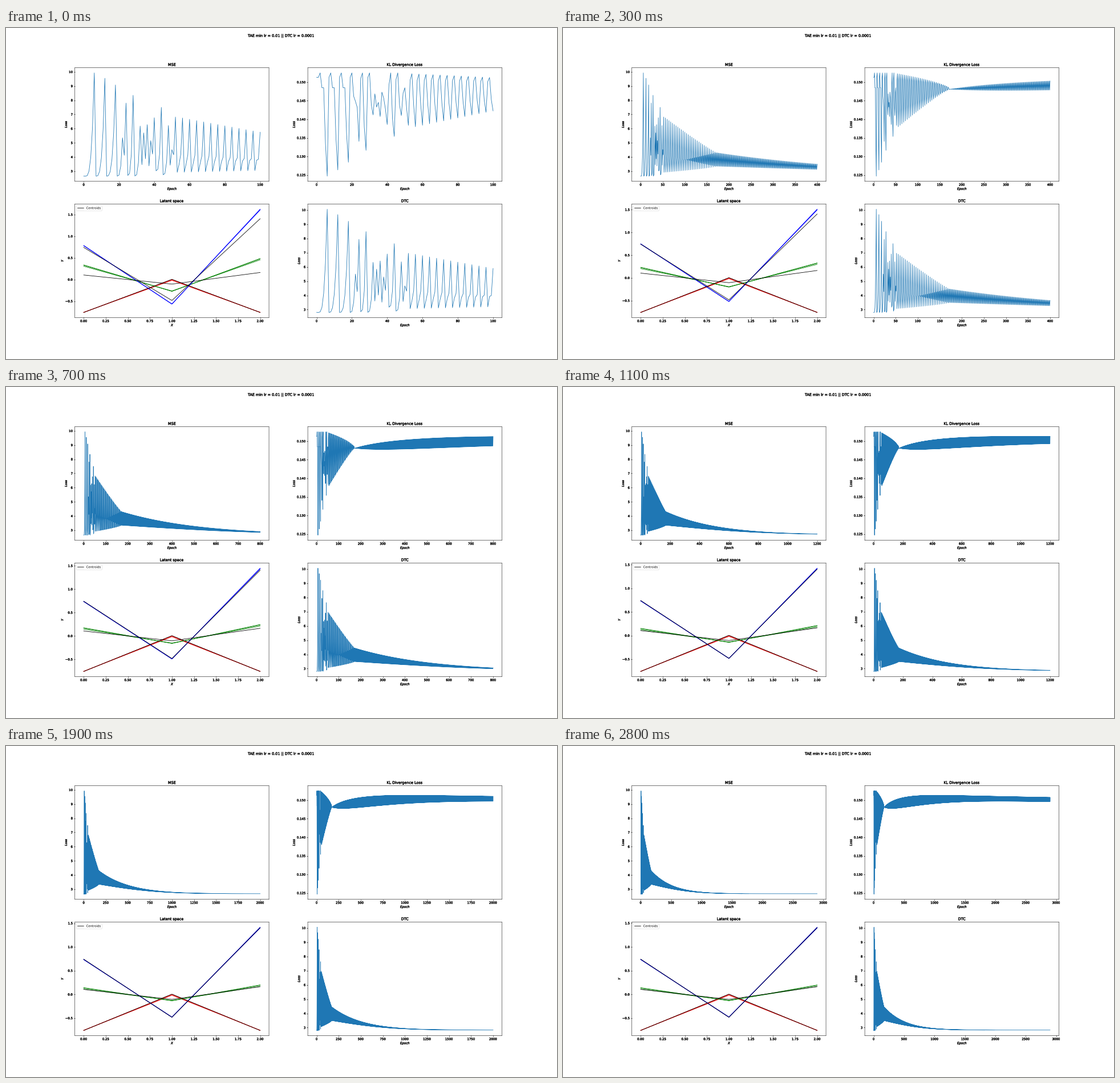
Animation, 966 px wide and 580 px high, one loop 2.9 s. Source, as a matplotlib script:

```python
import numpy as np
import matplotlib.pyplot as plt
from matplotlib import patheffects
from matplotlib.animation import FuncAnimation

DPI = 38.64
FRAMES, STEP, LAST = 29, 100, 2900
SETTLE = 172  # epoch where the four-step cycle becomes a two-step one

# Early spikes of the MSE: epochs since the previous spike, height
SPIKES = [(6, 9.93), (6, 9.55), (6, 9.08), (4, 5.35), (2, 7.80), (4, 8.35),
          (4, 6.18), (2, 5.70), (2, 6.28), (2, 5.15), (2, 6.77), (4, 7.50),
          (4, 6.22), (2, 4.52), (2, 6.82)]


def spikes():
    """Each spike grows from a floor; the higher the last spike, the lower the floor."""
    mse, kl, last = [2.66], [.1513], 10
    for gap, peak in SPIKES:
        low = 2.65 + 1.6 * np.exp(-((last - 4.9) / 1.55) ** 2)
        mse += list(low + (peak - low) * np.linspace(0, 1, gap) ** 3.3)
        dip = .1485 - .0044 * (peak - 4.52)
        kl.append(.1513 - .0055 * (low - 2.65))
        if gap > 2:
            kl += [.1525] + [.1485] * (gap - 4) + [dip + .37 * (.1485 - dip)]
        kl.append(dip)
        last = peak
    return mse, kl


def cycle(n, phases, end_even, end_odd):
    """Four phases, each a (start, power) ease towards its even or odd end."""
    start, power = np.array(phases)[n % 4].T
    end = np.where(n % 2 == 0, end_even, end_odd)
    left = (SETTLE - n) / (SETTLE - n[0])
    return end + (start - end) * left ** power


def tail(n):
    """Two-step cycle: upper edge on even epochs, lower edge on odd ones."""
    s, even = n - SETTLE, n % 2 == 0
    mse = 2.68 + np.where(even, 1.62 * np.exp(-.0029 * s - 4e-7 * s * s),
                          .67 * np.exp(-.00157 * s - 1.14e-6 * s * s))
    middle = .151 - .0029 * np.exp(-s / 500) - 3e-7 * s
    half = .00055 * (1 - np.exp(-s / 80)) + .0008 * s / 400 * np.exp(1 - s / 400)
    return mse, middle + np.where(even, half, -half)


epoch = np.arange(LAST + 1)
mse_start, kl_start = spikes()
mid, late = epoch[len(mse_start):SETTLE], epoch[SETTLE:]
mse_tail, kl_tail = tail(late)
mse = np.concatenate([
    mse_start,
    cycle(mid, [(6.82, 1.1), (2.92, .75), (3.45, 1), (4.2, 1.1)], 4.3, 3.35),
    mse_tail])
kl = np.concatenate([
    kl_start,
    cycle(mid, [(.1377, 1.15), (.1506, .4), (.1523, .6), (.1437, .9)], .1481, .1481),
    kl_tail])

# Latent curves: colour, first pose, final pose, decay times, spread between lines
GROUPS = [
    ("red", (-.758, .002, -.758), (-.758, .002, -.758), (380, 380, 380), (0, -.02, 0)),
    ("green", (.338, -.272, .487), (.140, -.133, .198), (400, 430, 380),
     (-.030, .008, -.032)),
    ("blue", (.786, -.567, 1.625), (.738, -.480, 1.415), (200, 380, 380),
     (-.006, .004, -.018)),
]
CENTROIDS = [(-.76, .005, -.76), (.105, -.105, .163), (.742, -.483, 1.405)]
SPREAD = (0, .3, 1)

HEAVY = [patheffects.withStroke(linewidth=.6, foreground="black")]
PLAIN = [patheffects.Normal()]


def dress(ax, title, xlabel, ylabel):
    ax.set_title(title, path_effects=HEAVY)
    ax.set_xlabel(xlabel, style="italic", path_effects=HEAVY)
    ax.set_ylabel(ylabel, style="italic", path_effects=HEAVY)


plt.rcParams.update({"font.family": "DejaVu Sans", "path.snap": False,
                     "axes.linewidth": 1, "xtick.major.width": 1.2,
                     "ytick.major.width": 1.2})
fig, axes = plt.subplots(2, 2, figsize=(966.001 / DPI, 580.001 / DPI), dpi=DPI)
fig.subplots_adjust(left=.125, right=.9, top=.88, bottom=.125, wspace=.2, hspace=.2)
fig.suptitle("TAE min lr = 0.01 || DTC lr = 0.0001", path_effects=HEAVY)

(ax_mse, ax_kl), (ax_latent, ax_dtc) = axes
losses = []
for ax, title, data in ((ax_mse, "MSE", mse), (ax_kl, "KL Divergence Loss", kl),
                        (ax_dtc, "DTC", mse + kl)):
    dress(ax, title, "Epoch", "Loss")
    losses.append((ax.plot([], [], color="#1f77b4")[0], data))

dress(ax_latent, "Latent space", "X", "Y")
latent = [[ax_latent.plot([], [], color=group[0])[0] for _ in SPREAD] for group in GROUPS]
for k, points in enumerate(CENTROIDS):
    ax_latent.plot(range(3), points, color="black", label=None if k else "Centroids")
legend = ax_latent.legend(loc="upper left")
legend.get_texts()[0].set_path_effects(PLAIN)


def update(frame):
    last = STEP * (frame + 1)
    for line, data in losses:
        line.set_data(epoch[:last + 1], data[:last + 1])
    for lines, (_, first, final, tau, spread) in zip(latent, GROUPS):
        first, final, tau, spread = map(np.array, (first, final, tau, spread))
        pose = final + (first - final) * np.exp(-(last - STEP) / tau)
        for line, s in zip(lines, SPREAD):
            line.set_data(range(3), pose + s * spread)
    for ax in axes.flat:
        ax.relim()
        ax.autoscale_view()
        for label in ax.get_xticklabels() + ax.get_yticklabels():
            label.set_path_effects(HEAVY)
    return []


anim = FuncAnimation(fig, update, frames=FRAMES, interval=100, init_func=lambda: [],
                     repeat=True, repeat_delay=0, blit=False)
plt.show()
```
